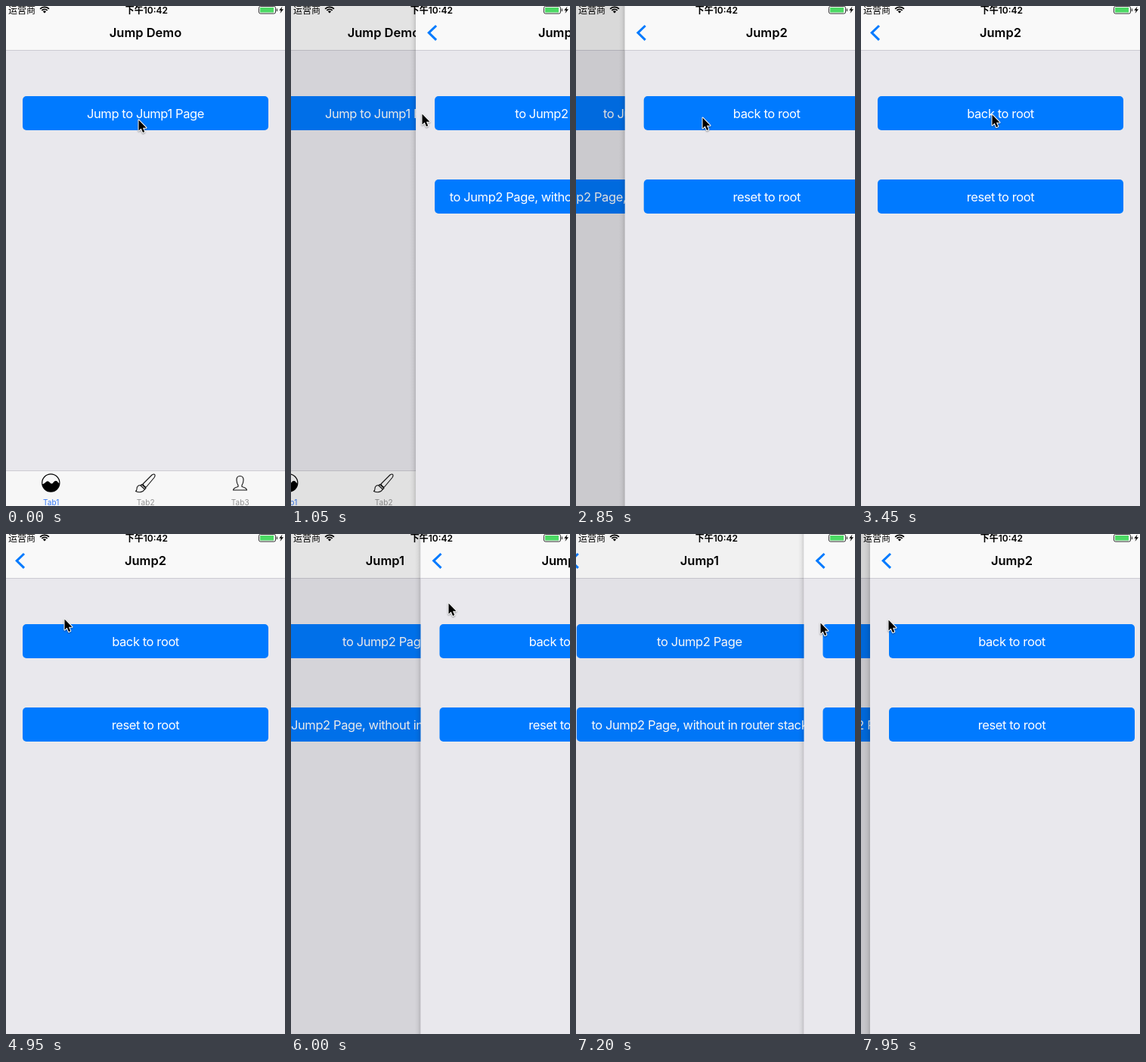
An HTML page with a canvas for the animation above (8 s loop, 369x660 px).

```html
<!DOCTYPE html>
<html lang="zh">
<head>
<meta charset="utf-8">
<title>Page navigation</title>
<style>
html, body { margin: 0; width: 100%; height: 100%; overflow: hidden; background: #e9e8ed; }
canvas { display: block; width: 369px; height: 660px; }
</style>
</head>
<body>
<canvas id="stage"></canvas>
<script>
const W = 369, H = 660, LOOP = 8000, STEP = 150;
const PAGE = 375, CROP = 3;
const BLUE = '#007aff';
const SANS = 'Inter, "Noto Sans CJK SC", "Noto Sans CJK", sans-serif';

const canvas = document.getElementById('stage');
const ctx = canvas.getContext('2d');
const dpr = window.devicePixelRatio || 1;
canvas.width = W * dpr;
canvas.height = H * dpr;

const pages = {
  home: { title: 'Jump Demo', buttons: ['Jump to Jump1 Page'], tabs: true },
  one: { title: 'Jump1', buttons: ['to Jump2 Page', 'to Jump2 Page, without in router stack'] },
  two: { title: 'Jump2', buttons: ['back to root', 'reset to root'] }
};

// [time, x, y] of the pointer tip
const pointerKeys = [
  [0, 175, 150], [150, 174, 147], [300, 173, 144], [450, 173, 142],
  [1200, 173, 142], [1650, 165, 149], [2100, 165, 149], [2400, 167, 147],
  [3150, 167, 147], [3450, 173, 143], [4800, 173, 143], [4950, 77, 112],
  [5250, 14, 106], [5400, 38, 103], [6000, 208, 91], [6450, 300, 104],
  [6900, 334, 116], [7050, 334, 116], [7200, 323, 117], [7350, 280, 117],
  [7800, 80, 114], [7950, 36, 113]
];

// [time, page offset] while the page is dragged by its edge
const dragKeys = [
  [5250, 0], [5400, 10], [6000, 174.5], [6450, 270], [6900, 312],
  [7050, 312], [7200, 304.5], [7350, 260], [7800, 59], [7950, 15]
];

function sample(keys, t) {
  if (t <= keys[0][0]) return keys[0].slice(1);
  for (let i = 1; i < keys.length; i++) {
    const a = keys[i - 1], b = keys[i];
    if (t <= b[0]) {
      const f = (t - a[0]) / (b[0] - a[0]);
      return a.slice(1).map((v, j) => v + (b[j + 1] - v) * f);
    }
  }
  return keys[keys.length - 1].slice(1);
}

function slideIn(elapsed) {
  const x = PAGE * Math.exp(-elapsed * 0.0107);
  return x < 0.35 ? 0 : x;
}

function rect(x, y, w, h, color) {
  ctx.fillStyle = color;
  ctx.fillRect(x, y, w, h);
}

function text(str, x, y, font, color, align = 'center', spacing = 0) {
  ctx.font = `${font} ${SANS}`;
  ctx.fillStyle = color;
  ctx.textAlign = align;
  ctx.letterSpacing = spacing + 'px';
  ctx.fillText(str, x, y);
}

function stroke(path, color, width) {
  ctx.strokeStyle = color;
  ctx.lineWidth = width;
  ctx.stroke(new Path2D(path));
}

function button(label, y, pressed) {
  ctx.save();
  if (pressed) ctx.globalAlpha = 0.55;
  ctx.fillStyle = BLUE;
  ctx.beginPath();
  ctx.roundRect(22, y, 325, 45, 5);
  ctx.fill();
  text(label, 184.5, y + 28.5, '400 16.5px', '#fff', 'center', -0.4);
  ctx.restore();
}

function waveIcon() {
  ctx.save();
  ctx.beginPath();
  ctx.arc(59.3, 629.5, 11.6, 0, 7);
  ctx.save();
  ctx.clip();
  ctx.fillStyle = '#000';
  ctx.fill(new Path2D('M46 631Q49 632 52 629Q55 625.5 58 629Q60.5 632 62.5 629Q66 624.5 69 629Q70 630.5 73 630V643H46Z'));
  ctx.restore();
  ctx.strokeStyle = '#000';
  ctx.lineWidth = 1.2;
  ctx.stroke();
  ctx.restore();
}

function tabBar() {
  rect(-CROP, 613, PAGE, 47, '#f7f7f7');
  rect(-CROP, 613, PAGE, 1, '#cdccd3');
  waveIcon();
  ctx.lineJoin = 'round';
  stroke('M181 631L193 619Q196 617 197 619Q197.500 620.500 196 622.500L185.500 635Q183 635 181 631Z' +
    'M179.500 631.500L185 636.500L183.500 638L178 633Z' +
    'M177.500 632.500Q173 633 173 637.500Q173 639.500 171.500 640.500Q177 643 181 640.500Q183.500 639 183 637', '#111', 1.1);
  stroke('M309.500 620.500Q314.500 620.500 314 626.500Q313.500 631 312 632.500V634.500Q318 636 318.500 639H300.500' +
    'Q301 636 307 634.500V632.500Q305.500 631 305 626.500Q304.500 620.500 309.500 620.500Z', '#111', 1.1);
  ['Tab1', 'Tab2', 'Tab3'].forEach((name, i) =>
    text(name, 59.7 + 125 * i, 658.5, '400 10px', i ? '#929292' : '#3478f6', 'center', 0.1));
}

function drawPage(page, x, { pressed = false, dim = 0, shadow = false } = {}) {
  ctx.save();
  ctx.translate(x, 0);
  if (shadow) {
    const g = ctx.createLinearGradient(-CROP - 8, 0, -CROP, 0);
    g.addColorStop(0, 'rgba(0,0,0,0)');
    g.addColorStop(0.5, 'rgba(0,0,0,.04)');
    g.addColorStop(1, 'rgba(0,0,0,.14)');
    rect(-CROP - 8, 0, 8, H, g);
  }
  rect(-CROP, 0, PAGE, H, '#e9e8ed');
  rect(-CROP, 0, PAGE, 58, '#f9f9f9');
  rect(-CROP, 58, PAGE, 1, '#cbcad2');
  text(page.title, 184.5, 41, '600 16.5px', '#000');
  page.buttons.forEach((label, i) => button(label, 119 + 110 * i, pressed && i === 0));
  if (page.tabs) {
    tabBar();
  } else {
    ctx.lineJoin = 'miter';
    stroke('M24 26L14.200 35.300L24 44.800', BLUE, 3);
  }
  if (dim) rect(-CROP, 0, PAGE, H, `rgba(0,0,0,${dim})`);
  ctx.restore();
}

function drawPair(under, over, x) {
  if (x > 0) {
    const left = 1 - x / PAGE;
    drawPage(under, -0.3 * PAGE * left, { dim: 0.16 * left });
  }
  drawPage(over, x, { shadow: x > 0 });
}

function statusBar() {
  text('运营商', 3, 9.8, '400 12px', '#000', 'left');
  text('下午10:42', 185.8, 9.8, '600 12px', '#000');

  ctx.lineCap = 'butt';
  ctx.strokeStyle = '#000';
  ctx.lineWidth = 1.8;
  for (const r of [8, 5]) {
    ctx.beginPath();
    ctx.arc(51, 9.3, r, -Math.PI * 0.76, -Math.PI * 0.24);
    ctx.stroke();
  }
  ctx.fillStyle = '#000';
  ctx.beginPath();
  ctx.moveTo(51, 9.6);
  ctx.arc(51, 9.3, 2.9, -Math.PI * 0.76, -Math.PI * 0.24);
  ctx.fill();

  ctx.lineWidth = 1;
  ctx.strokeStyle = '#333';
  ctx.beginPath();
  ctx.roundRect(334.5, 0.5, 22, 9.5, 2);
  ctx.stroke();
  rect(336, 2, 18, 6.5, '#4cd964');
  rect(357.8, 3.5, 1.2, 3.5, '#333');
  ctx.fillStyle = '#000';
  ctx.fill(new Path2D('M365.500 0.500L361.300 5.800H363.800L362.500 9.800L367 4.300H364.300Z'));
}

function drawPointer(x, y) {
  const arrow = new Path2D('M0.500 0.500V14.500L3.700 11.600L6 17L8.300 16L6 10.700H10.500Z');
  ctx.save();
  ctx.translate(x, y);
  ctx.lineJoin = 'round';
  ctx.strokeStyle = '#fff';
  ctx.lineWidth = 2;
  ctx.shadowColor = 'rgba(0,0,0,.4)';
  ctx.shadowBlur = 2 * dpr;
  ctx.shadowOffsetY = dpr;
  ctx.stroke(arrow);
  ctx.shadowColor = 'transparent';
  ctx.fillStyle = '#000';
  ctx.fill(arrow);
  ctx.restore();
}

function draw(t) {
  const { home, one, two } = pages;
  ctx.setTransform(dpr, 0, 0, dpr, 0, 0);
  if (t < 1050) drawPage(home, 0, { pressed: t >= 750 });
  else if (t < 2400) drawPair(home, one, slideIn(t - 975));
  else if (t < 2700) drawPage(one, 0, { pressed: true });
  else if (t < 4950) drawPair(one, two, slideIn(t - 2690));
  else drawPair(one, two, sample(dragKeys, t)[0]);
  statusBar();
  drawPointer(...sample(pointerKeys, t));
}

const start = performance.now();
function tick() {
  const t = (performance.now() - start) % LOOP;
  draw(Math.floor(t / STEP) * STEP);
  requestAnimationFrame(tick);
}
tick();
</script>
</body>
</html>
```
